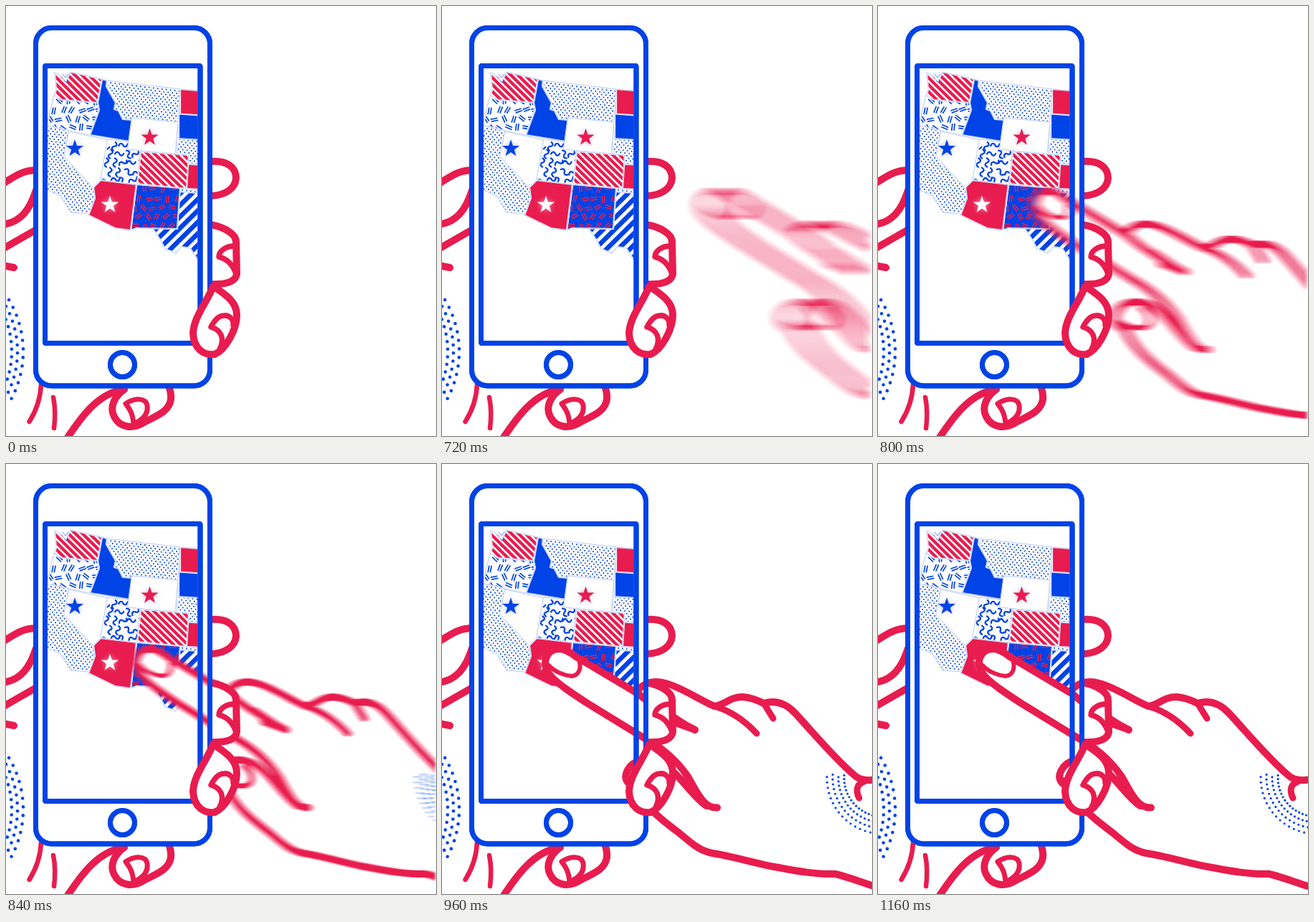
Animation, 600 px wide and 600 px high, one loop 1920 ms. Source, as an HTML page with a canvas:

```html
<!DOCTYPE html>
<html lang="en">
<head>
<meta charset="utf-8">
<title>Tapping a map</title>
<style>
html, body { margin: 0; width: 100%; height: 100%; overflow: hidden; background: #fff; }
canvas { display: block; width: 600px; height: 600px; }
</style>
</head>
<body>
<canvas id="stage" width="600" height="600"></canvas>
<script>
const SIZE = 600, RED = '#e81c4e', BLUE = '#0043e6', WHITE = '#fff';
const LOOP = 1920, STEP = 40, ENTER = 640, REST = 1160, SHUTTER = 20;

const stage = document.getElementById('stage').getContext('2d');

function layer() {
  const c = document.createElement('canvas');
  c.width = c.height = SIZE;
  const g = c.getContext('2d');
  g.lineCap = g.lineJoin = 'round';
  return g;
}

let seed = 20471113;
function rnd() {
  seed = (seed * 16807) % 2147483647;
  return seed / 2147483647;
}

function line(g, d, color = RED, width = 10) {
  g.strokeStyle = color;
  g.lineWidth = width;
  g.stroke(new Path2D(d));
}

function area(g, d, color = WHITE) {
  g.fillStyle = color;
  g.fill(new Path2D(d));
}

function dot(g, x, y, r) {
  g.fillStyle = BLUE;
  g.beginPath();
  g.arc(x, y, r, 0, 7);
  g.fill();
}

// Rings of dots between two angles, used to shade the wrists
function dotArcs(g, cx, cy, radius, rings, from, to, gap, size) {
  for (let k = 0; k < rings; k++) {
    const r = radius - k * 8, turn = gap / radius;
    for (let a = from + (k % 2) * turn / 2; a < to; a += turn) {
      dot(g, cx + r * Math.cos(a), cy + r * Math.sin(a), size);
    }
  }
}

function star(g, x, y, color) {
  g.save();
  g.shadowColor = color === WHITE ? 'rgba(255,255,255,.5)' : 'rgba(90,90,160,.4)';
  g.shadowBlur = 6;
  g.fillStyle = color;
  g.beginPath();
  for (let i = 0; i < 10; i++) {
    const r = i % 2 ? 5 : 12.8, a = i * Math.PI / 5 - Math.PI / 2;
    g.lineTo(x + r * Math.cos(a), y + r * Math.sin(a));
  }
  g.fill();
  g.restore();
}

// Pattern fills, drawn inside an active clip
const solid = color => g => {
  g.fillStyle = color;
  g.fillRect(0, 0, SIZE, SIZE);
};

const dots = g => {
  g.save();
  g.rotate(0.12);
  for (let j = 0; j < 90; j++) {
    for (let i = 0; i < 52; i++) dot(g, 50 + i * 6 + (j % 2) * 3, 40 + j * 3.5, 1);
  }
  g.restore();
};

const stripes = (color, angle, width, gap) => g => {
  g.save();
  g.translate(160, 200);
  g.rotate(angle);
  g.fillStyle = color;
  for (let y = -300; y < 300; y += gap) g.fillRect(-300, y, 600, width);
  g.restore();
};

const scatter = (x0, y0, gap, mark) => g => {
  for (let j = 0; j < 6; j++) {
    for (let i = 0; i < 6; i++) {
      g.save();
      g.translate(x0 + (i + (j % 2) / 2) * gap + rnd() * 3, y0 + j * gap + rnd() * 3);
      g.rotate(rnd() * Math.PI);
      mark(g);
      g.restore();
    }
  }
};

const dashes = color => g => line(g, 'M-4.5,-1.6H4 M-4,1.6H4.5', color, 1.7);
const squiggle = g => line(g, 'M-6,1C-4,-4 -1,-2 0,0S4,4 6,-1', BLUE, 2.3);
const redStripes = stripes(RED, 0.78, 4.3, 6.9);
const blueStripes = stripes(BLUE, -0.78, 6.6, 11.4);
const redDashes = scatter(178, 254, 13, dashes(RED));

function state(g, pts, fill) {
  const d = `M${pts}Z`;
  g.save();
  g.clip(new Path2D(d));
  solid(WHITE)(g);
  if (fill) fill(g);
  g.restore();
  line(g, d, WHITE, 2.2);
  line(g, d, 'rgba(0,67,230,.42)', 0.7);
}

// Later states overlap earlier ones, so each shared border is drawn once
function drawMap(g) {
  g.save();
  g.beginPath();
  g.rect(57.5, 87, 210, 380);
  g.clip();
  [solid(RED), solid(BLUE), dots, solid(RED), dots].forEach((fill, i) => {
    const x = 243 - i * 2, y = 116 + i * 34.5;
    state(g, `${x},${y} 270,${y + 2} 270,262 ${x},260`, fill);
  });
  state(g, '239,259 270,261 270,358 257,338 245,336 237,345 222,339 215,326 203,308', blueStripes);
  state(g, '56,166 90,174 130,255 117,290 90,288 76,265 56,256', dots);
  state(g, '67,126 130,134 125,182 57,167', scatter(60, 131, 12.5, dashes(BLUE)));
  state(g, '68,93 79,99 83,106 90,92 134,102 128,135 78,131 67,125 70,117', redStripes);
  state(g, '141,104 243,116 240,162 150,158', dots);
  state(g, '88,175 142,187 131,250 122,254 81,210');
  state(g, '142,186 190,192 183,250 132,243', scatter(138, 194, 12, squiggle));
  state(g, '134,102 141,104 140,112 153,135 151,144 157,146 163,158 176,159 172,189 117,180 130,145 128,135', solid(BLUE));
  state(g, '176,156 240,162 236,206 170,200');
  state(g, '188,203 255,208 252,255 183,248', redStripes);
  state(g, '182,249 243,254 239,311 182,310 174,313', g => { solid(BLUE)(g); redDashes(g); });
  state(g, '132,243 182,249 174,313 152,310 115,292 124,268 122,253', solid(RED));
  line(g, 'M79,95l4,5 4,-5 M81,104l3,3 3,-5', 'rgba(0,67,230,.6)', 1);
  star(g, 96, 199, BLUE);
  star(g, 200.5, 183.5, RED);
  star(g, 145, 277.5, WHITE);
  g.restore();
}

function drawFrame(g) {
  g.strokeStyle = BLUE;
  g.lineWidth = 7;
  g.beginPath();
  g.roundRect(41.5, 30.5, 243, 499.5, 22);
  g.roundRect(54.5, 83.5, 216.5, 387, 1);
  g.moveTo(179.5, 500.5);
  g.arc(162.5, 500.5, 17, 0, 7);
  g.stroke();
}

function drawBase(g) {
  solid(WHITE)(g);
  line(g, 'M-5,248C10,240 20,229 44,229');
  line(g, 'M-5,305C20,302 33,285 42,257');
  line(g, 'M-5,339L44,311');
  line(g, 'M-5,362L11,365');
  line(g, 'M49,528C48,550 42,565 32.5,580', RED, 6.5);
  line(g, 'M66,546Q70,566 67,589', RED, 6.5);
  dotArcs(g, -116, 482, 140, 3, -0.54, 0.54, 12, 2.3);
  line(g, 'M86,602C104,575 128,540 165,535');
  line(g, 'M165,535C151,545 144,560 151,573C159,589 177,590 191,582C206,573 227,568 230,549Q231,539 226,528');
  line(g, 'M167,555C180,546 195,547 197,557C199,570 190,578 178,583C177,572 175,565 167,555', RED, 7);
  line(g, 'M286,217C308,215 321,225 321,240C320,255 306,264 286,265');
  g.fillStyle = WHITE;
  g.beginPath();
  g.roundRect(41.5, 30.5, 243, 499.5, 22);
  g.fill();
  drawMap(g);
  drawFrame(g);
}

function drawFront(g) {
  drawFrame(g);
  g.save();
  g.beginPath();
  g.rect(288, 290, 60, 110);
  g.clip();
  const finger = 'M284,305C304,308 321,318 321,329L322,374C320,386 304,389 284,388';
  area(g, finger);
  line(g, finger);
  line(g, 'M320,335C306,334 297,343 297,350C309,353 317,362 321,374', RED, 7.5);
  g.restore();
  const thumb = 'M289,391C281,413 262,433 261,457C262,479 277,488 291,486C306,480 322,452 322,431C322,412 305,402 289,391Z';
  area(g, thumb);
  line(g, thumb);
  line(g, 'M317,445C318,437 311,431 304,432C296,432 290,440 286,448C300,452 306,464 298,479', RED, 7.5);
}

function drawHand(g) {
  const index = 'M268,319L184,269C170,258 157,255 148,262C138,271 139,285 149,296C160,308 180,321 200,334'
    + 'L275,380C301,394 322,410 340,436C352,457 362,481 381,479.5';
  const knuckles = 'M268,318C280,303 294,302 309,306C330,311 356,329 377,338C393,336 397,325 417,325'
    + 'C430,326 440,331 446,334C462,329 476,333 490,348C516,376 543,409 572,434Q582,444 604,440';
  const thumb = 'M366,477C346,465 324,425 300,416C282,410 264,412 256,427C249,440 256,447 268,452'
    + 'C280,478 300,494 328,515C348,532 358,540 374,543C400,547 430,556 460,562C492,568 520,573 545,572C560,575 580,583 606,591';
  area(g, index + 'L377,338Z');
  area(g, thumb + 'V440Z');
  dotArcs(g, 612, 438, 78, 4, 1.6, 3.25, 7.6, 1.6);

  line(g, thumb);
  line(g, 'M257,440C270,447 296,456 302,442Q304,430 292,422', RED, 7);
  line(g, index);
  area(g, 'M322,414L340,436L372,480L346,462Z', RED);
  line(g, knuckles);
  line(g, 'M268,318C290,338 318,354 350,371');
  area(g, 'M306,338L350,367L347,375L316,364Z', RED);
  line(g, 'M377,338Q409,347 436,376', RED, 9);
  line(g, 'M446,334L459,355', RED, 9);
  line(g, 'M586,443C575,447 574,456 579,466', RED, 9);
  line(g, 'M146,281C153,289 166,295 178,296C187,295 191,287 189,277', RED, 6);
}

const base = layer(), front = layer(), hand = layer();
const buffers = [layer(), layer()];
drawBase(base);
drawFront(front);
drawHand(hand);

function offset(t) {
  const left = Math.max(0, (REST - t) / (REST - ENTER));
  return 580 * Math.pow(left, 5.5);
}

// Box blur along x: each pass averages two copies, halving their distance
function smear(source, width, x) {
  let from = source.canvas, at = x;
  for (let i = 0, d = width / 4; i < 7; i++, d /= 2) {
    const g = buffers[i % 2];
    g.globalCompositeOperation = 'lighter';
    g.globalAlpha = 0.5;
    g.clearRect(0, 0, SIZE, SIZE);
    g.drawImage(from, at - d, 0);
    g.drawImage(from, at + d, 0);
    from = g.canvas;
    at = 0;
  }
  return from;
}

function showHand(t) {
  const from = offset(t - SHUTTER / 2), to = offset(t + SHUTTER / 2), width = from - to;
  if (width < 2) stage.drawImage(hand.canvas, offset(t), 0);
  else stage.drawImage(smear(hand, width, (from + to) / 2), 0, 0);
}

let shown = -1;
function render(now) {
  const t = Math.min(REST, Math.floor((now % LOOP) / STEP) * STEP);
  if (t === shown) return;
  shown = t;
  stage.drawImage(base.canvas, 0, 0);
  if (t > ENTER) showHand(t);
  stage.drawImage(front.canvas, 0, 0);
}

function tick() {
  render(performance.now());
  requestAnimationFrame(tick);
}
tick();
</script>
</body>
</html>
```
